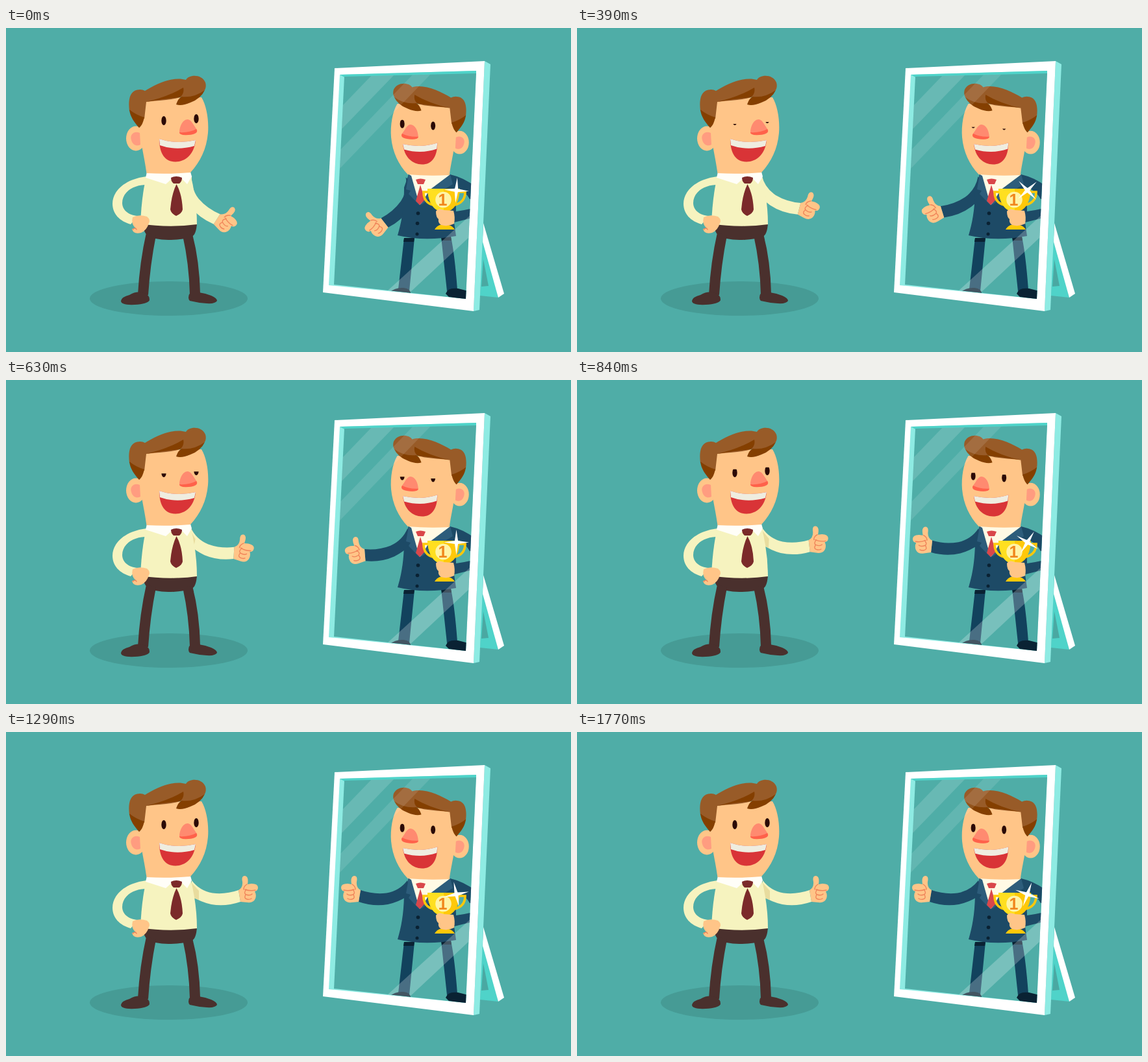
These frames come from a looping animation (870 px wide and 500 px high, 1.8 s). An HTML page:

```html
<!DOCTYPE html>
<html lang="en">
<head>
<meta charset="utf-8">
<title>Mirror</title>
<style>
html, body { margin: 0; width: 100%; height: 100%; overflow: hidden; background: #4fada7; }
svg { display: block; }
.skin { fill: #ffc588; }
.line { fill: none; stroke: #f0855a; stroke-width: 1.4; stroke-linecap: round; }
.pants { fill: #4a302d; }
.shirt { fill: #f6f3bf; color: #f6f3bf; }
.navy { fill: #1d4a66; color: #1d4a66; }
</style>
</head>
<body>
<svg width="870" height="500" viewBox="0 0 870 500">
<defs>
  <clipPath id="glass"><path d="M521 75L724 70L708 418L505 396Z"/></clipPath>

  <g id="head">
    <ellipse class="skin" cx="200" cy="170.500" rx="15" ry="19"/>
    <path class="skin" d="M214 108L301 107C309 120 312.500 143 311 162C309 186 299 207 284 223Q250 226 216.500 224C213 197 207 180 206 148Z"/>
    <path fill="#ff9c80" d="M206 162C197 158 190 165 193 173C195 181 202 183 207 180Z"/>
    <g fill="#2b0a06">
      <ellipse cx="243" cy="143" rx="3.700" ry="7"/>
      <ellipse cx="293" cy="140" rx="3.700" ry="7"/>
    </g>
    <path id="lids" class="skin"/>
    <path fill="#ff8a70" d="M267 162C267 152 272 141 280 141C286 142 288 149 294 157Q296 164 281 165Q268 165 267 162Z"/>
    <path fill="#ff614a" d="M267 161Q282 162 293 156Q298 163 281 165Q267 166 267 161Z"/>
    <path fill="#d93437" d="M236 171Q262 180 292 173C290 195 276 206.500 261 206.500C245 206.500 236 194 236 171Z"/>
    <path fill="#efede0" d="M236 171Q262 180 292 173L290 182Q262 190 237 181Z"/>
    <path fill="#985b28" d="M190 128C188 112 190 98 202 95.500Q209 94 214 97C232 86 258 74 277 80C281 72 301 70 307 84C311 98 298 105 284 110C275 113 268 112 264 116L270 106C255 112 235 111 216 114L213 140Z"/>
    <g fill="#843f00">
      <path d="M190 126Q200 134 213 138C211 146 209 151 205 154C198 146 191 137 190 126Z"/>
      <path d="M216 114Q250 106 273 92Q275 101 268 107Q240 110 216 114Z"/>
      <path d="M262 118Q265 109 270 106Q290 108 306 96Q300 109 284 115Q270 121 262 118Z"/>
    </g>
  </g>

  <g id="arm">
    <path fill="currentColor" d="M286 229Q298 245 318 248.500Q338 251 358 244L361 262Q338 270 316 266Q298 262 284 252Z"/>
    <path class="skin" d="M358 244Q365 240 364 231Q362 222 368 222Q374 223 372 235L378 234Q388 234 388 240Q388 245 383 246Q386 251 384 257Q381 264 372 263L361 262Z"/>
    <path class="line" d="M371 235Q366 238 366 243M368 243Q376 246 384 244M370 243Q365 249 370 251Q376 253 379 250M369 251Q366 257 371 258Q375 259 378 257"/>
  </g>
</defs>

<!-- man -->
<ellipse cx="250.500" cy="417.500" rx="121.500" ry="26.500" fill="#469b95"/>
<g class="pants">
  <path d="M211 301L294 301Q293 319 286 322Q273 327 250 327Q228 327 218 320Q211 315 211 301Z"/>
  <path d="M216 316Q206 360 203 411L219 412Q222 365 231 320Z"/>
  <path d="M272 320Q282 365 283 411L299 410Q298 360 287 318Z"/>
  <path d="M177 421Q178 415 190 412Q202 405 212 409Q222 412 221 420Q218 426 198 427Q177 428 177 421Z"/>
  <path d="M281 416Q281 406 292 407Q305 409 316 413Q325 417 325 421Q322 426 309 425Q295 424 283 421Q281 419 281 416Z"/>
</g>
<g class="shirt">
  <g id="armL"><use href="#arm"/><path fill="#e8dc9e" d="M286 233L297 245V259L288 256Z"/></g>
  <path d="M217 226Q209 255 207 302Q250 309 294 303Q294 265 284 226Z"/>
  <path d="M218 229C186 232 164 250 164 271C164 287 175 298 192 303L203 290C189 289 179 281 179 270C179 255 193 243 214 242Z"/>
</g>
<path class="skin" d="M195 292Q205 287 217 291Q223 296 220 301Q217 312 208 316Q196 319 194 310L200 309Q192 303 195 292Z"/>
<path class="line" d="M195 311Q199 307 201 311"/>
<path fill="#fffef8" d="M217 222L215 231L246 241L255 233L270 232L279 241L286 229L284 222Z"/>
<path fill="#7b2a2a" d="M254 231Q262 227 271 231Q271 237 267 240H258Q254 237 254 231ZM262.500 241Q255 256 253 280Q254 286 262 290Q271 286 272 280Q271 256 262.500 241Z"/>
<use href="#head"/>

<!-- mirror stand and frame -->
<path fill="#4fd3c9" d="M734 318L758 416L730 413Z"/>
<path fill="#4aa8a2" d="M735 357L743 398L732 399Z"/>
<path fill="#fff" d="M735 301L767 410L758 416L734 330Z"/>
<path fill="#8eebe3" d="M737 51L746 56L729 435L720 437Z"/>
<path fill="#fff" d="M506 62L737 51L720 437L488 408Z"/>
<path fill="#8eebe3" d="M514 72L724 66L708 418L497 397Z"/>
<path fill="#4fd3c9" d="M514 72L724 66V71L521 76Z"/>
<path fill="#4fada7" d="M521 75L724 70L708 418L505 396Z"/>

<!-- reflection -->
<g clip-path="url(#glass)">
  <path fill="#12425d" d="M613 324L604 403L621 406L629 324ZM670 322L679 406L695 404Q691 350 685 322Z"/>
  <path fill="#0a2233" d="M613 324H629L628 330H612ZM670 322H685L686 328H671ZM590 408Q600 400 612 401Q624 402 623 412ZM677 410Q680 400 696 402L712 406V420L682 415Z"/>
  <g class="navy">
    <g transform="matrix(-1 0 0 1 904 0)"><g id="armR"><use href="#arm"/></g></g>
    <path d="M620 226L613 246C613 278 609 300 603 320Q645 330 693 321L690 300L726 291V276Q710 281 693 283L692 246Q706 250 714 264L726 264V247Q706 231 684 226Z"/>
  </g>
  <path fill="#fffae5" d="M621 226L637 273L684 226Z"/>
  <path fill="#2d5d7b" d="M620 226L616 249L623 251L620 256L637 274L624 228ZM684 226L652 250L638 274L660 258L688 241Z"/>
  <path fill="#d9474b" d="M631 234Q638 231 646 234L643 241H634ZM638 242L631 267L637 273L645 265Z"/>
  <g fill="#0a2233"><circle cx="634.500" cy="286" r="2.800"/><circle cx="633.500" cy="301.500" r="2.800"/><circle cx="633" cy="318" r="2.500"/></g>
  <use href="#head" transform="matrix(-.95 0 0 .94 888.500 16.400)"/>
  <g fill="#fff">
    <path opacity=".14" d="M566 70L600 70L514 159L516 122Z"/>
    <path opacity=".11" d="M630 68L657 68L510 221L512 191Z"/>
    <path opacity=".23" d="M716 288L588 405L620 410L714 322Z"/>
  </g>
</g>

<!-- trophy -->
<path fill="none" stroke="#ffc80a" stroke-width="3.600" d="M652 253H643Q643 269 657 273M696 253H707Q707 269 691 273"/>
<path fill="#ffc80a" d="M649 248H699C698 268 691 281 678 284V303Q688 305 691 311H660Q663 305 671 303V284C657 281 650 268 649 248Z"/>
<path fill="#ffdf20" d="M649 248H674V284C657 282 650 268 649 248Z"/>
<circle cx="673.500" cy="265" r="12.300" fill="#fff3a6"/>
<text x="672.500" y="273.500" text-anchor="middle" font-family="'Liberation Sans', Arial, sans-serif" font-weight="bold" font-size="25" fill="#f0861c">1</text>
<path class="skin" d="M662 283Q666 277 674 281L689 282Q692 292 690 302Q680 307 670 304Q665 301 666 295Q662 292 662 283Z"/>
<path id="star" fill="#fff"/>
</svg>

<script>
const $ = id => document.getElementById(id);
const LOOP = 1800, STEP = 30, RAISE = 900;
const PIVOT = [287, 236];
const SPIN = [[0, 4], [180, 33], [390, 47], [630, 90], [840, 122], [1290, 168], [1800, 202]];

// four long points joined by a narrow waist
$('star').setAttribute('d', 'M' + Array.from({ length: 8 }, (_, i) => {
  const r = i % 2 ? 3.6 : 19.5, a = i * Math.PI / 4;
  return `${r * Math.sin(a)} ${-r * Math.cos(a)}`;
}).join('L') + 'Z');

function spinAt(t) {
  const i = SPIN.findIndex(k => k[0] > t);
  const [t0, a0] = SPIN[i - 1], [t1, a1] = SPIN[i];
  return a0 + (a1 - a0) * (t - t0) / (t1 - t0);
}

// p: 0 = arm lowered, 1 = arm raised; the elbow straightens only near the top
function poseArm(id, p, angle, dx, dy) {
  const bend = 1 - p ** 3;
  $(id).setAttribute('transform',
    `translate(${dx * bend} ${dy * bend}) rotate(${angle * (1 - p)} ${PIVOT})`);
}

function draw(now) {
  const t = Math.floor(now % LOOP / STEP) * STEP;
  const p = Math.min(t / RAISE, 1);
  poseArm('armL', p, 42, -4.8, -2.2);
  poseArm('armR', p, 47, -3, 0);
  const lid = 13.8 * (1 - Math.abs(2 * p - 1)) + 1;
  $('lids').setAttribute('d', `M238 135h10v${lid}h-10zM288 132h10v${lid}h-10z`);
  $('star').setAttribute('transform', `translate(693.5 250.5) rotate(${spinAt(t)})`);
  requestAnimationFrame(draw);
}
requestAnimationFrame(draw);
</script>
</body>
</html>
```
